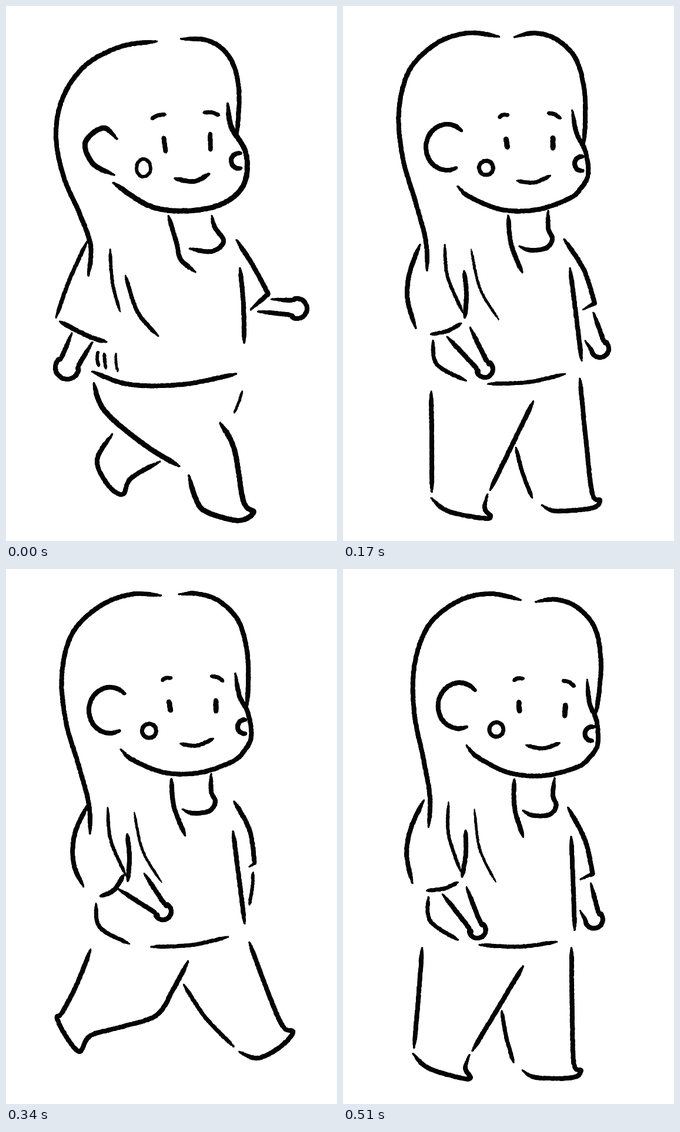
These frames come from a looping animation (563x909 px, 680 ms). An HTML page with a canvas:

```html
<!DOCTYPE html>
<html lang="en">
<head>
<meta charset="utf-8">
<title>Walk cycle</title>
<style>
  html, body { margin: 0; width: 100%; height: 100%; overflow: hidden; background: #fff; }
  canvas {
    position: absolute; left: 0; top: 0; width: 563px; height: 909px;
    visibility: hidden;
    animation: pose 680ms step-end infinite;
    animation-delay: calc((var(--i) - 4) * 170ms);
  }
  @keyframes pose {
    0% { visibility: visible; }
    25%, 100% { visibility: hidden; }
  }
</style>
</head>
<body>
<script>
const RAD = Math.PI / 180;
let ctx, seed = 7;

function rand() {
  seed = (seed * 16807) % 2147483647;
  return seed / 2147483647;
}

const parse = s => s.split(' ').map(p => p.split(',').map(Number));

function mix(a, b, c, d, t) {
  const curve = 2 * a - 5 * b + 4 * c - d + t * (3 * (b - c) + d - a);
  return b + 0.5 * t * (c - a + t * curve);
}

// Catmull-Rom spline sampled into short steps
function spline(pts) {
  const out = [], last = pts.length - 1;
  for (let i = 0; i < last; i++) {
    const a = pts[Math.max(i - 1, 0)], b = pts[i], c = pts[i + 1], d = pts[Math.min(i + 2, last)];
    const n = Math.ceil(Math.hypot(c[0] - b[0], c[1] - b[1]));
    for (let k = 0; k < n; k++) {
      out.push([mix(a[0], b[0], c[0], d[0], k / n), mix(a[1], b[1], c[1], d[1], k / n)]);
    }
  }
  out.push(pts[last]);
  return out;
}

function dot(x, y, r) {
  ctx.beginPath();
  ctx.arc(x, y, r, 0, Math.PI * 2);
  ctx.fill();
}

// Rough ink line that thins towards both ends
function inkPoints(pts, w, thin = 0.4) {
  const line = spline(pts), last = line.length - 1;
  const fade = Math.min(40, last / 4);
  line.forEach(([x, y], i) => {
    const full = Math.min(1, thin + Math.min(i, last - i) / fade);
    const r = full * w / 2 - 0.3 + (rand() - 0.5) * 0.5;
    dot(x + rand() - 0.5, y + rand() - 0.5, Math.max(0.6, r));
  });
}

const ink = (path, w = 8) => inkPoints(parse(path), w);

function arcPoints(cx, cy, rx, ry, from, to) {
  const n = 12;
  return Array.from({ length: n + 1 }, (_, k) => {
    const a = (from + (to - from) * k / n) * RAD;
    return [cx + rx * Math.cos(a), cy + ry * Math.sin(a)];
  });
}

const arc = (cx, cy, rx, ry, from, to, w) => inkPoints(arcPoints(cx, cy, rx, ry, from, to), w, 0.7);
const ring = (cx, cy, rx, ry, w) => inkPoints(arcPoints(cx, cy, rx, ry, 0, 360), w, 1);

// Forearm: out to a round hand, around it and back
function arm(from, hand, r, back) {
  const [[ax, ay], [hx, hy], [bx, by]] = parse(`${from} ${hand} ${back}`);
  const start = Math.atan2(ay - hy, ax - hx) / RAD - 35;
  let end = Math.atan2(by - hy, bx - hx) / RAD + 35;
  while (end > start - 180) end -= 360;
  inkPoints([[ax, ay], ...arcPoints(hx, hy, r, r, start, end), [bx, by]], 8);
}

function head(leftTop, rightTop) {
  ink(leftTop + ' 160,63 113,109 95,180 102,260 124,335 141,400 143,450');
  ink(rightTop + ' 395,88 410,140 412,195 409,238');
  ink('390,177 397,215 412,246 417,285 405,309 385,327 330,346 270,346 215,324 195,306');
  ink('265,190 272,185 282,185', 7);
  ink('348,182 360,184 370,191', 7);
  ink('277,224 280,242', 9);
  ink('357,222 357,243', 9);
  ring(243.5, 275, 12, 12, 7);
  arc(406, 268, 12, 12, -80, -280, 8);
  ink('296,297 325,300 353,288', 7);
  arc(177, 240, 36, 39, -46, -296, 8);
}

function shirt() {
  ink('173,405 178,460 204,521', 6);
  ink('206,450 210,490 207,530');
  ink('218,413 233,480 265,533', 5);
  ink('281,356 286,405 305,453');
  ink('349,348 349,378 356,395 346,411 318,415 300,408');
  ink('386,445 397,530 406,603');
  ink('246,642 315,639 378,625', 7);
  ink('153,568 160,609 210,637', 7);
}

function standingLimbs() {
  ink('131,405 113,455 110,500 124,548');
  ink('149,558 178,552 201,539', 7);
  arm('177,562', '241,617', 14, '216,546');
  ink('376,396 410,449 428,505 428,505 408,516');
  arm('412,569', '437,582', 15, '426,521');
  ink('150,655 151,740 151,826');
  ink('150,836 178,858 235,870 251,868 241,853 246,829');
  ink('324,671 288,745 250,823');
  ink('294,750 306,795 322,836', 7);
  ink('403,633 413,735 424,828 437,840 423,853 362,858 338,848');
}

function stridingLimbs() {
  ink('140,399 117,450 115,500 132,540');
  ink('160,556 183,546 200,520');
  arm('190,543', '267,582', 14, '235,517');
  ink('388,395 414,443 423,500 423,500 414,506');
  ink('420,515 419,540 414,571', 6);
  ink('144,646 122,702 96,753 87,764 106,800 125,820 136,801 150,790 200,777 256,758 284,715 310,666');
  ink('302,706 340,763 388,812', 7);
  ink('414,634 442,710 470,776 488,787 465,813 428,831 396,820');
}

function leaning() {
  ink('257,60 195,69 135,101 97,155 85,220 98,290 124,350 144,407 140,459');
  ink('297,56 345,59 380,87 396,140 393,222');
  ink('377,165 383,205 408,250 405,302 370,335 310,348 245,340 182,300', 9);
  ink('247,192 258,186 272,184', 7);
  ink('336,181 350,181 363,186', 7);
  ink('268,222 272,249');
  ink('347,215 348,246');
  ring(234, 275, 12, 15, 6);
  arc(396, 263, 13, 13, -75, -285, 8);
  ink('287,293 320,298 346,285');
  ink('189,226 165,207 135,232 148,268 184,287', 9);

  ink('276,356 290,402 297,430 322,452');
  ink('350,356 355,376 370,400 350,417 312,412');
  ink('177,413 181,470 194,519', 6);
  ink('203,458 224,520 259,561', 7);
  ink('138,400 108,465 85,530', 7);
  ink('91,536 140,561 171,571');
  arm('112,556', '104,614', 20, '147,571');
  ink('157,587 155,599 158,612', 6);
  ink('167,590 168,603 170,616', 6);
  ink('187,590 187,605 190,621', 5);
  ink('146,621 210,643 300,643 392,625');
  ink('398,445 404,510 405,573');
  ink('392,397 420,441 446,489 446,489 416,516');
  arm('428,519', '495,514', 17, '451,498');

  ink('149,640 168,688 235,745 295,782', 9);
  ink('181,727 155,771 172,812 198,830 213,802 262,774');
  ink('402,654 396,673 388,692', 5);
  ink('364,708 388,752 404,842 421,860 395,874 340,859 322,835 311,797', 9);
}

function standing() {
  head('266,52 213,46', '291,53 325,46 362,56');
  shirt();
  standingLimbs();
}

function striding() {
  head('264,45 213,43', '294,43 325,42 362,54');
  shirt();
  stridingLimbs();
}

// The standing pose, tipped around the near eye
function tipped() {
  ctx.translate(299, 234);
  ctx.rotate(5 * RAD);
  ctx.translate(-278, -233);
  standing();
}

[leaning, standing, striding, tipped].forEach((draw, i) => {
  const c = document.createElement('canvas');
  c.width = 563;
  c.height = 909;
  c.style.setProperty('--i', i);
  ctx = c.getContext('2d');
  ctx.fillStyle = '#050505';
  draw();
  document.body.append(c);
});
</script>
</body>
</html>
```
